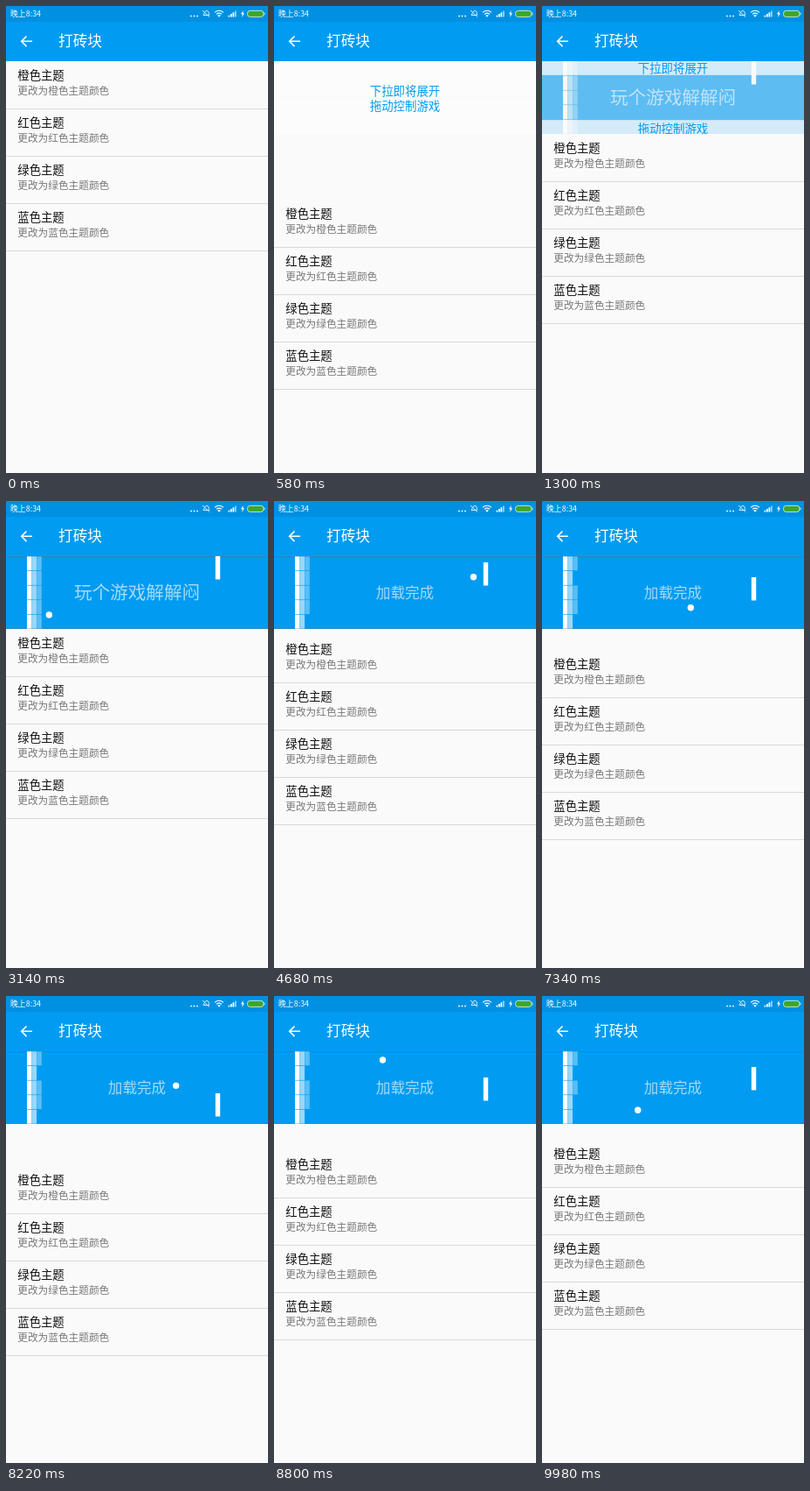
An HTML page with a canvas that plays this animation: 300 px wide and 533 px high, repeating every 10 s.

```html
<!DOCTYPE html>
<html lang="zh-CN">
<head>
<meta charset="utf-8">
<title>打砖块</title>
<style>
html, body { margin: 0; width: 100%; height: 100%; overflow: hidden; background: #fafafa; }
canvas { display: block; width: 100vw; height: 100vh; }
</style>
</head>
<body>
<canvas id="stage" width="300" height="533"></canvas>
<script>
const ctx = document.getElementById('stage').getContext('2d');
const LOOP = 10000, TOP = 63, HEADER = 83, BLUE = '#019bf1';
const FONT = '"Noto Sans CJK SC", "Noto Sans CJK", sans-serif';

// Vertical list offset over time: [ms, px]
const PULL = [[0, 0], [40, 2], [560, 158], [700, 158], [820, 108], [980, 83], [3250, 83],
  [3900, 93], [4300, 92], [4680, 90], [5110, 106], [5500, 108], [5980, 110], [6110, 103],
  [6600, 95], [7130, 95], [7340, 107], [7880, 125], [8150, 130], [8240, 131], [9150, 101], [LOOP, 101]];

const OPEN_START = 840, OPEN_TIME = 800, DONE_AT = 3900;
const BALL = { start: 1640, speed: 0.121, left: 45.7, width: 190, hit: 3171,
  rise: 0.06986, top: 67.4, height: 75.4, topAt: 4404, radius: 3.7 };
const BOUNCE = 2 * BALL.width / BALL.speed;
const HIT_ROWS = [4, 1, 3];
const COLUMN_ALPHA = [1, 0.6, 0.35];

const clamp = v => Math.max(0, Math.min(1, v));
const fold = (u, size) => {
  const m = ((u % (2 * size)) + 2 * size) % (2 * size);
  return m < size ? m : 2 * size - m;
};

function offsetAt(t) {
  const i = PULL.findIndex(k => k[0] > t);
  const [t0, a] = PULL[i - 1], [t1, b] = PULL[i];
  return Math.round(a + (b - a) * (t - t0) / (t1 - t0));
}

function rect(x, y, w, h, color) {
  ctx.fillStyle = color;
  ctx.fillRect(x, y, w, h);
}

function text(str, x, middle, size, color, align = 'left') {
  ctx.font = `${size}px ${FONT}`;
  ctx.textAlign = align;
  ctx.fillStyle = color;
  ctx.fillText(str, x, middle + size * 0.38);
}

function path(d, color, width) {
  const p = new Path2D(d);
  if (width) {
    ctx.strokeStyle = color;
    ctx.lineWidth = width;
    ctx.stroke(p);
  } else {
    ctx.fillStyle = color;
    ctx.fill(p);
  }
}

function dot(x, y, r) {
  ctx.beginPath();
  ctx.arc(x, y, r, 0, 7);
  ctx.fillStyle = '#fff';
  ctx.fill();
}

function drawBars() {
  rect(0, 0, 300, 18, '#0090e2');
  rect(0, 18, 300, TOP - 18, BLUE);
  text('晚上8:34', 5, 9, 8.9, '#fff');
  for (let i = 0; i < 3; i++) dot(212 + i * 3.5, 11.5, 0.9);
  path('M226 10.5 L228 6.5 Q230 4 232 6.5 L232.5 10.5 Z M225 5 L233 12.5', '#e4f4fd', 0.9);
  path('M239 7.4 Q244 3.2 249 7.4 M241 9.4 Q244 6.8 247 9.4', '#fff', 1.1);
  path('M242.2 10.8 Q244 9.3 245.8 10.8 L244 12.8 Z', '#fff');
  for (let i = 0; i < 4; i++) rect(254.5 + i * 2.5, 10.7 - i * 1.7, 1.8, 1.8 + i * 1.7, i < 3 ? '#fff' : '#8fd0f6');
  path('M271.6 5 L269 9.3 H270.8 L270 13 L273 8.2 H271.3 Z', '#fff');
  ctx.beginPath();
  ctx.roundRect(276.5, 5.4, 18.3, 7, 3);
  ctx.fillStyle = '#3fa62a';
  ctx.fill();
  ctx.strokeStyle = '#d4ecd4';
  ctx.lineWidth = 0.9;
  ctx.stroke();
  rect(295.4, 7.4, 1, 3, '#d4ecd4');
  path('M30 40.3 H18 M23.5 34.5 L17.7 40.3 L23.5 46.1', '#fff', 1.6);
  text('打砖块', 60, 40, 16.7, '#fff');
}

function drawList(y) {
  ['橙色', '红色', '绿色', '蓝色'].forEach((name, i) => {
    const row = y + i * 54;
    text(name + '主题', 13.3, row + 16, 13.35, '#111');
    text(`更改为${name}主题颜色`, 13.3, row + 33.5, 11.67, '#777');
    rect(0, row + 54, 300, 1, '#d9d9d9');
  });
}

function drawGame(t, off) {
  rect(0, 0, 300, HEADER, BLUE);
  rect(0, 0, 300, 0.3, '#606060');
  rect(0, HEADER - 0.3, 300, 0.3, '#606060');
  const brickH = HEADER / 5;
  for (let col = 0; col < 3; col++) {
    for (let row = 0; row < 5; row++) {
      const hit = HIT_ROWS.indexOf(row);
      if (col === 2 && hit >= 0 && t >= BALL.hit + hit * BOUNCE) continue;
      rect(24 + col * 5.7, row * brickH + 0.3, 5.4, brickH - 0.6, `rgba(255,255,255,${COLUMN_ALPHA[col]})`);
    }
  }
  rect(239.8, t < BALL.start ? 0 : off - HEADER, 5.4, 26.5, '#fff');
  const done = t >= DONE_AT;
  text(done ? '加载完成' : '玩个游戏解解闷', 150, 41.5, done ? 16.6 : 20.6, 'rgba(255,255,255,.64)', 'center');
  if (t >= BALL.start) {
    const x = BALL.left + fold((t - BALL.hit) * BALL.speed, BALL.width);
    const y = BALL.top + fold((t - BALL.topAt) * BALL.rise, BALL.height);
    dot(x, y - TOP, BALL.radius);
  }
}

function drawCurtain(t) {
  const p = (1 - Math.cos(Math.PI * clamp((t - OPEN_START) / OPEN_TIME))) / 2;
  if (p === 1) return;
  const half = HEADER / 2, shift = p * half;
  const band = `rgba(252,252,252,${1 - 0.4 * p})`;
  rect(0, 0, 300, HEADER, `rgba(242,242,242,${1 - p})`);
  rect(0, -shift, 300, half, band);
  rect(0, half + shift, 300, half, band);
  text('下拉即将展开', 150, half - shift - 8, 13.4, BLUE, 'center');
  text('拖动控制游戏', 150, half + shift + 9.3, 13.4, BLUE, 'center');
}

function draw(now) {
  const t = now % LOOP, off = offsetAt(t);
  rect(0, 0, 300, 533, '#fafafa');
  drawList(TOP + off);
  if (off > 0) {
    ctx.save();
    ctx.translate(0, TOP + Math.min(0, off - HEADER));
    ctx.beginPath();
    ctx.rect(0, 0, 300, HEADER);
    ctx.clip();
    drawGame(t, off);
    drawCurtain(t);
    ctx.restore();
  }
  drawBars();
}

const begin = performance.now();
function tick() {
  draw(performance.now() - begin);
  requestAnimationFrame(tick);
}
tick();
</script>
</body>
</html>
```
